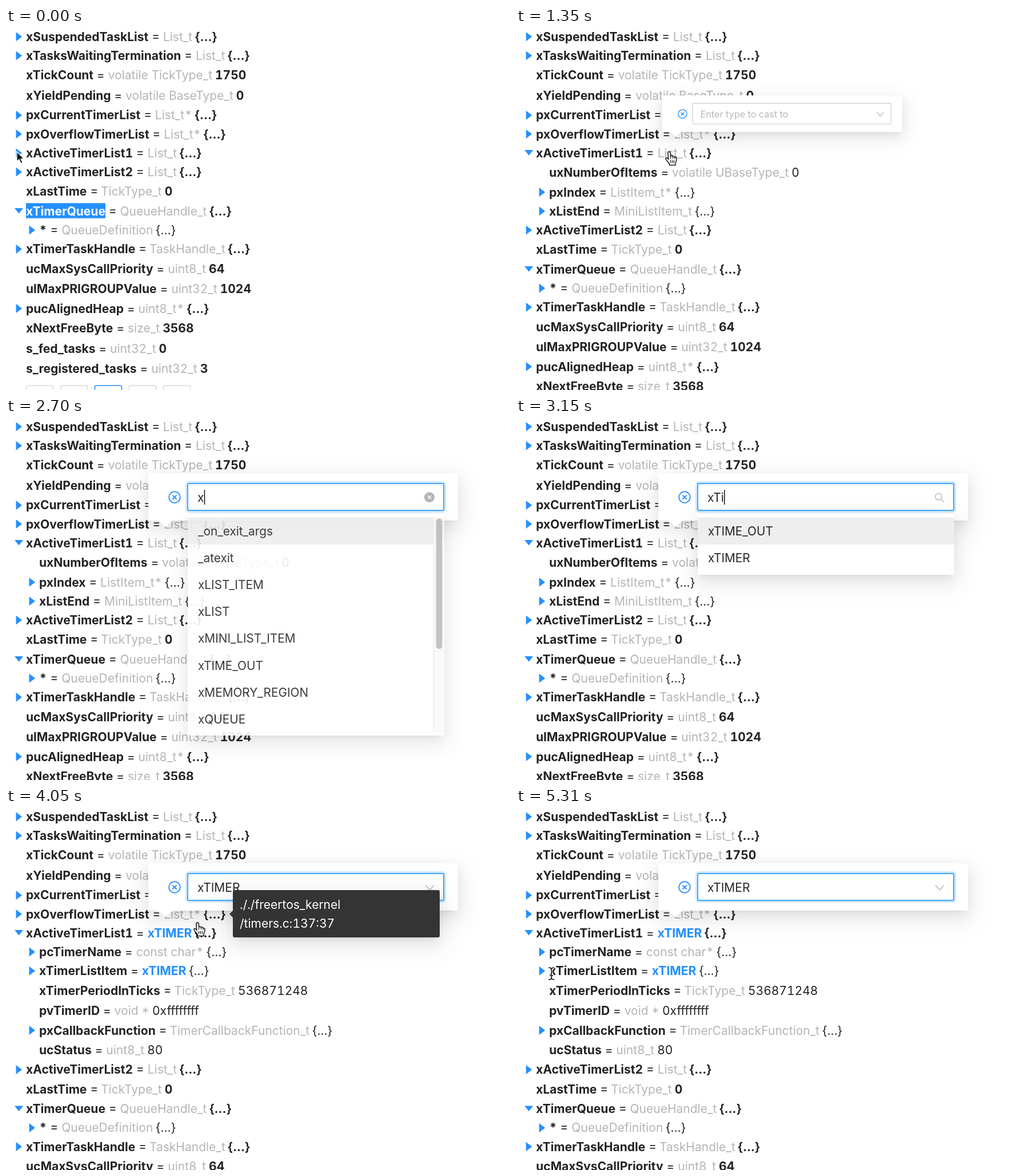
These frames come from a looping animation (882 px wide and 635 px high, 5.4 s). An HTML page:

```html
<!DOCTYPE html>
<html lang="en">
<head>
<meta charset="utf-8">
<title>Variable tree</title>
<style>
html, body { margin: 0; width: 100%; height: 100%; overflow: hidden; background: #fff; }
body { position: relative; font: 21px Inter, sans-serif; font-feature-settings: "tnum"; color: #262626; }
svg, .box { position: absolute; }
svg { left: 0; top: 0; }
text { white-space: pre; }
.b { font-weight: 700; }
.type { fill: #b5b5b5; }
.cast { fill: #2490ff; font-weight: 700; }
.box { box-sizing: border-box; border-radius: 3px; }
.shadow { box-shadow: 0 4px 9px -6px rgba(0,0,0,.12), 0 9px 24px rgba(0,0,0,.08), 0 13px 42px 12px rgba(0,0,0,.055); }
#pop { left: 249px; top: 97px; width: 542px; height: 83px; background: #fff; transform-origin: 30px 94px; }
#pop svg, #tip svg { overflow: visible; }
#field { left: 68px; top: 17px; width: 450px; height: 49px; border: 2px solid #d9d9d9; }
#field.on { border-color: #40a9ff; box-shadow: 0 0 0 3px rgba(24,144,255,.2); }
#drop { left: 318px; top: 169px; width: 449px; background: #fff; overflow: hidden; transform-origin: 0 0; }
#list { font-size: 20.8px; }
#tip { left: 397px; top: 144px; width: 362px; height: 83px; background: #343434; transform-origin: -6px 42px; }
</style>
</head>
<body>
<svg id="tree" width="882" height="635"></svg>
<div id="pop" class="box shadow">
  <svg width="542" height="83">
    <path d="M17 82.500L30 94L43 82.500Z" fill="#fff"/>
    <g fill="none" stroke="#2490ff" stroke-width="1.800"><circle cx="46" cy="42" r="9.800"/><path d="M42.500 38.500l7 7m0-7l-7 7"/></g>
  </svg>
  <div id="field" class="box"></div>
  <svg id="entry" width="542" height="83"></svg>
</div>
<div id="drop" class="box shadow"><svg id="list" width="449" height="388"></svg></div>
<div id="tip" class="box shadow">
  <svg width="362" height="83" fill="#fff">
    <path d="M.5 35.500L-6 42L.5 48.500Z" fill="#343434"/>
    <text x="12" y="33">././freertos_kernel</text><text x="12" y="66">/timers.c:137:37</text>
  </svg>
</div>
<svg id="mouse" width="882" height="635"></svg>
<script>
const $ = id => document.getElementById(id);
const LOOP = 5400, STEP = 90;
const OPEN = 270, CLICK = 1170, FOCUS = 2160, TYPE = 2610, PICK = 3780;
const clamp = v => Math.max(0, Math.min(1, v));
const ramp = (t, a, b) => clamp((t - a) / (b - a));
const out = u => 1 - (1 - u) * (1 - u);

// Row: optional > for a child, marker (+ closed, - open, space leaf), name | type | value
const HEAD = `+xSuspendedTaskList|List_t|{…}
+xTasksWaitingTermination|List_t|{…}
 xTickCount|volatile TickType_t|1750
 xYieldPending|volatile BaseType_t|0
+pxCurrentTimerList|List_t*|{…}
+pxOverflowTimerList|List_t*|{…}`;
const PLAIN = `> uxNumberOfItems|volatile UBaseType_t|0
>+pxIndex|ListItem_t*|{…}
>+xListEnd|MiniListItem_t|{…}`;
const CAST = `>+pcTimerName|const char*|{…}
>+xTimerListItem|xTIMER|{…}
> xTimerPeriodInTicks|TickType_t|536871248
> pvTimerID|void *|0xffffffff
>+pxCallbackFunction|TimerCallbackFunction_t|{…}
> ucStatus|uint8_t|80`;
const TAIL = `+xActiveTimerList2|List_t|{…}
 xLastTime|TickType_t|0
-xTimerQueue|QueueHandle_t|{…}
>+*|QueueDefinition|{…}
+xTimerTaskHandle|TaskHandle_t|{…}
 ucMaxSysCallPriority|uint8_t|64
 ulMaxPRIGROUPValue|uint32_t|1024
+pucAlignedHeap|uint8_t*|{…}
 xNextFreeByte|size_t|3568
 s_fed_tasks|uint32_t|0
 s_registered_tasks|uint32_t|3`;
const TYPES = ['_on_exit_args', '_atexit', 'xLIST_ITEM', 'xLIST', 'xMINI_LIST_ITEM',
  'xTIME_OUT', 'xMEMORY_REGION', 'xQUEUE', 'xTIMER'];

function row(line, y, selected) {
  const kid = line[0] === '>';
  if (kid) line = line.slice(1);
  const mark = line[0], [name, type, value] = line.slice(1).split('|');
  const x = kid ? 58 : 35;
  const tri = mark === '+' ? `M${x - 17.5} ${y - 8.2}l10.500 8l-10.500 8Z`
    : mark === '-' ? `M${x - 20} ${y - 5.5}h15l-7.500 9.500Z` : '';
  const hit = selected && name === 'xTimerQueue';
  return `<path d="${tri}" fill="#2490ff"/>` +
    (hit ? `<rect x="35" y="${y - 14.3}" width="139" height="26.500" fill="#2490ff"/>` : '') +
    `<text x="${x}" y="${y + 7.3}" fill="#222"><tspan class="b"${hit ? ' fill="#fff"' : ''}>${name}</tspan>` +
    `<tspan dx="6">=</tspan><tspan dx="6" class="${type === 'xTIMER' ? 'cast' : 'type'}">${type}</tspan>` +
    `<tspan dx="5" class="${kid ? '' : 'b'}">${value}</tspan></text>`;
}

function drawTree(t) {
  const open = t >= OPEN, cast = t >= PICK;
  const mid = (open ? '-' : '+') + `xActiveTimerList1|${cast ? 'xTIMER' : 'List_t'}|{…}`;
  const lines = [HEAD, mid, ...(open ? [cast ? CAST : PLAIN] : []), TAIL].join('\n').split('\n');
  let y = -1.1, svg = '';
  for (const line of lines) {
    const h = /^>? /.test(line) ? 35.6 : 33.2;
    svg += row(line, y + h / 2, t < CLICK);
    y += h;
  }
  for (let i = 0; i < 5; i++)
    svg += `<rect x="${35.5 + i * 60}" y="${y + 11.5}" width="47" height="47" rx="3" fill="#fff" stroke="${i === 2 ? '#2490ff' : '#d9d9d9'}" stroke-width="1.500"/>`;
  $('tree').innerHTML = svg;
}

function show(el, alpha, transform) {
  el.style.display = alpha > 0 ? 'block' : 'none';
  el.style.opacity = alpha;
  el.style.transform = transform;
}

const typed = t => t < TYPE ? '' : t >= PICK ? 'xTIMER'
  : 'xTimer'.slice(0, 1 + Math.max(0, Math.min(5, Math.floor((t - 2970) / STEP))));

function drawPop(t) {
  const u = out(ramp(t, CLICK, 1530));
  show($('pop'), clamp(u * 1.6), u < 1 ? `scale(${0.1 + 0.9 * u})` : 'none');
  $('field').className = t >= FOCUS ? 'box on' : 'box';
  const word = typed(t), typing = t >= TYPE && t < PICK;
  const icon = !typing ? '<path d="M485 38.500l7.500 8.500l7.500-8.500" fill="none" stroke="#bfbfbf" stroke-width="1.800"/>'
    : t < 2970 ? '<circle cx="492" cy="42" r="9" fill="#b4b4b4"/><path d="M489 39l6 6m0-6l-6 6" stroke="#fff" stroke-width="1.600"/>'
    : '<g fill="none" stroke="#bfbfbf" stroke-width="1.600"><circle cx="490.500" cy="41" r="5.800"/><path d="M495 45.500l5 5"/></g>';
  $('entry').innerHTML = `<text x="86" y="49.500" fill="${word ? '#262626' : '#b8b8b8'}">${word || 'Enter type to cast to'}</text>${icon}`;
  if (t >= FOCUS && t < PICK) {
    const x = word ? 87 + $('entry').firstChild.getComputedTextLength() : 86;
    $('entry').innerHTML += `<path d="M${x} 29v26" stroke="#111" stroke-width="1.500"/>`;
  }
}

function drawList(t) {
  const key = t < PICK ? typed(t) : 'xTimer';
  const hits = TYPES.filter(s => s.toLowerCase().includes(key.toLowerCase()));
  const full = hits.length > 8, h = full ? 388 : hits.length * 47.2 + 12;
  const fade = t < PICK ? 0.9 * ramp(t, 2520, 2700) + 0.1 * ramp(t, 2700, 2790) : 0.5 * (1 - ramp(t, PICK, 3870));
  show($('drop'), fade, `scaleY(${t < PICK ? 0.8 + 0.2 * ramp(t, 2520, 2700) : 0.85})`);
  $('drop').style.height = h + 'px';
  let svg = `<rect y="5.500" width="449" height="47.500" fill="#eee"/>`;
  hits.slice(0, 8).forEach((s, i) => svg += `<text x="18" y="${37 + i * 47.1}" fill="#262626">${s}</text>`);
  if (full) svg += '<rect x="430" y="6" width="18" height="376" fill="#fafafa"/><path d="M430 6v376" stroke="#e4e4e4"/>' +
    '<rect x="434.500" y="7" width="11" height="229" rx="5.500" fill="#bdbdbd"/>';
  $('list').innerHTML = svg;
}

const SHAPES = {
  arrow: '<path d="M0 0V17L4 13.500L7 20.500L10 19.200L7 12.500L12 12Z" fill="#111" stroke="#fff" stroke-width="1.200"/>',
  hand: '<path d="M-2.200 2C-2.200-.6 2-.6 2.200 2L2.600 8C3 6.600 6.400 6.400 6.600 8.800C7.400 7.600 10 7.800 10 10C11 9 13 9.600 13 11.600C13.200 15 12.400 17 11.400 19L11 23.500H.6L0 20.500C-2 18-5 14.500-6 12.600C-6.800 10.800-4.400 9.600-3 11.200L-1.200 13Z" fill="#fff" stroke="#111" stroke-width="1.500"/>' +
    '<path d="M2.600 8v4M6.500 8.800v3.200M10 10v2.500M2.500 15v5M5.500 15v5M8.500 15v5" stroke="#111" stroke-width="1.200"/>',
  beam: ['#fff" stroke-width="3.500', '#111" stroke-width="1.600'].map(c =>
    `<path d="M-5-10Q0-10 0-7Q0-10 5-10M0-7V8M-5 11Q0 11 0 8Q0 11 5 11M-3 4H3" fill="none" stroke="${c}"/>`).join('')
};
// time, x, y, shape used from that time on
const PATH = [
  [0, 19, 217, 'arrow'], [90, 21, 217, 'hand'], [450, 22, 217, 'hand'], [720, 22, 217, 'hand'],
  [810, 60, 219, 'beam'], [990, 240, 220, 'beam'], [1080, 268, 217, 'hand'], [1350, 268, 217, 'hand'],
  [1620, 300, 190, 'arrow'], [1800, 350, 162, 'beam'], [1980, 356, 159, 'beam'], [2160, 358, 150, 'beam'],
  [2520, 358, 150, ''], [3420, 365, 165, 'beam'], [3510, 362, 185, 'hand'], [3690, 357, 195, 'hand'],
  [3780, 357, 196, 'hand'], [4050, 335, 201, 'hand'], [4320, 320, 212, 'hand'], [4500, 300, 222, 'arrow'],
  [4680, 200, 250, 'beam'], [4950, 70, 286, 'beam'], [5310, 62, 290, 'beam']
];

function drawMouse(t) {
  let i = PATH.length - 1;
  while (PATH[i][0] > t) i--;
  const a = PATH[i], b = PATH[i + 1] || a, u = b === a ? 0 : ramp(t, a[0], b[0]);
  const x = a[1] + (b[1] - a[1]) * u, y = a[2] + (b[2] - a[2]) * u;
  $('mouse').innerHTML = `<g transform="translate(${x} ${y})">${SHAPES[a[3]] || ''}</g>`;
}

function render(t) {
  drawTree(t);
  drawPop(t);
  drawList(t);
  const tip = Math.min(ramp(t, 3870, 4050), 1 - ramp(t, 4230, 4410));
  show($('tip'), tip, `scale(${0.8 + 0.2 * tip})`);
  drawMouse(t);
}

function tick() {
  const t = performance.now() % LOOP;
  render(Math.floor(t / STEP) * STEP);
  requestAnimationFrame(tick);
}
tick();
</script>
</body>
</html>
```
